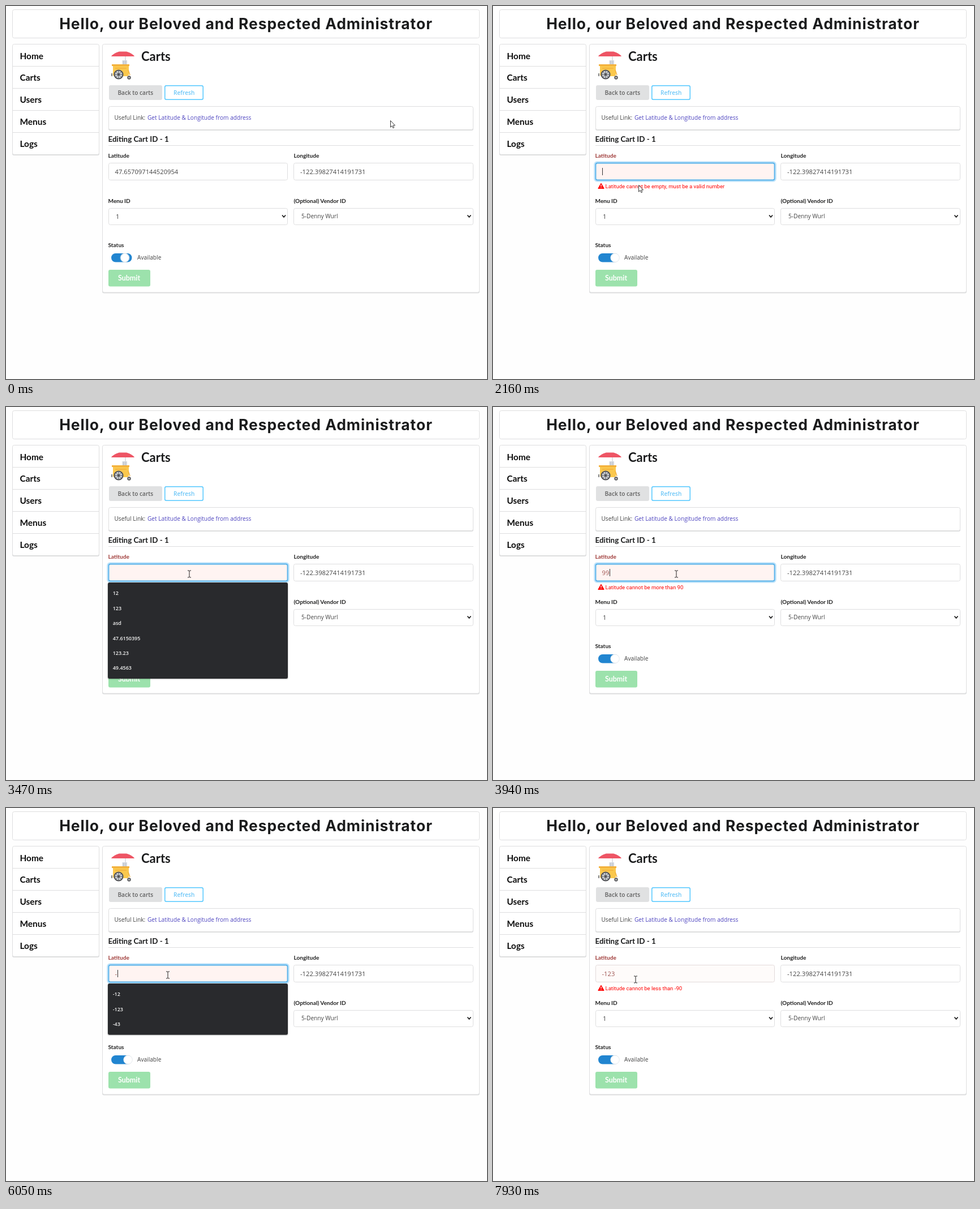
These frames come from a looping animation (850x659 px, 7.99 s). An HTML page:

```html
<!DOCTYPE html>
<html lang="en">
<head>
<meta charset="utf-8">
<title>Cart admin</title>
<style>
html, body { margin: 0; width: 100%; height: 100%; overflow: hidden; background: #fefefe; }
svg { display: block; width: 850px; height: 659px; }
text { white-space: pre; }
.title { font: 700 26.5px Inter, sans-serif; letter-spacing: .92px; fill: #1b1c1d; text-anchor: middle; }
.nav { font: 700 15.4px Lato, sans-serif; fill: #0d0d0d; }
.h2 { font: 700 22px Lato, sans-serif; fill: #1b1c1d; }
.h4 { font: 700 13.4px Lato, sans-serif; fill: #1b1c1d; }
.label { font: 700 10.1px Lato, sans-serif; fill: #222; }
.body { font: 400 10.15px "Open Sans", sans-serif; fill: #444; }
.input { font: 400 11.2px "Open Sans", sans-serif; fill: #444; }
.btn { font: 600 10.1px "Open Sans", sans-serif; text-anchor: middle; }
.submit { font: 700 12.5px Lato, sans-serif; fill: #fff; text-anchor: middle; }
.error { font: 400 9.55px Roboto, sans-serif; fill: #f00; }
.item { font: 600 9px "Open Sans", sans-serif; fill: #f2f2f2; }
.card { fill: #fff; stroke: #dededf; }
.shade { fill: #dcddde; }
.box { fill: #fff; stroke: #dededf; }
.rule { stroke: #dededf; }
.chev { fill: none; stroke: #111; stroke-width: 1.6; }
.knob { animation: slide 180ms ease-out both; }
@keyframes slide { from { transform: translateX(-5.5px); } to { transform: none; } }
</style>
</head>
<body>
<svg viewBox="0 0 850 659">
  <rect class="card" x="11.5" y="6.5" width="825" height="50" rx="3"/>
  <text class="title" x="424" y="40.5">Hello, our Beloved and Respected Administrator</text>

  <rect class="shade" x="11" y="69" width="154" height="195" rx="3"/>
  <rect class="card" x="11.5" y="67.5" width="153" height="195" rx="3"/>
  <g id="nav"></g>

  <rect class="shade" x="170" y="69" width="667" height="438.5" rx="3"/>
  <rect class="card" x="170.5" y="67.5" width="666" height="438.5" rx="3"/>

  <g id="cart">
    <path d="M211 88v16" stroke="#d3d6db" stroke-width="1.4"/>
    <rect x="205.5" y="96" width="8.5" height="8" fill="#d5d9df"/>
    <path d="M207.500 97v6M211 97v6" stroke="#b4bac3" stroke-width=".8"/>
    <path d="M186 89q3-5 14-8.500h13q11 3.500 14 8.500z" fill="#ee5565"/>
    <path d="M189 105h28v16q0 3-3 3h-22q-3 0-3-3z" fill="#fbc84d"/>
    <path d="M187 103h31v3h-31z" fill="#f3b13c"/>
    <path d="M193 110h20" stroke="#f3b13c" stroke-width="1.500"/>
    <path d="M216 113l3 9" stroke="#f3b13c" stroke-width="1.500"/>
    <path d="M187 119v5" stroke="#666" stroke-width="1.600"/>
    <circle cx="199" cy="121" r="7.500" fill="#cfd3d8" stroke="#55565a" stroke-width="2.200"/>
    <path d="M199 114v14M192 121h14M194 116l10 10M204 116l-10 10" stroke="#55565a"/>
    <circle cx="199" cy="121" r="2.400" fill="#55565a"/>
    <circle cx="217.500" cy="126.500" r="2.400" fill="#bbb" stroke="#55565a" stroke-width="1.600"/>
  </g>
  <text class="h2" x="239" y="96.500">Carts</text>

  <rect x="182" y="140" width="94" height="26" rx="3" fill="#e0e1e2"/>
  <text class="btn" x="228.800" y="157" fill="#606060">Back to carts</text>
  <rect x="280.750" y="140.750" width="67.500" height="24.500" rx="2.500" fill="#fff" stroke="#54c8ff" stroke-width="1.500"/>
  <text class="btn" x="314.700" y="157" fill="#6cc6f7">Refresh</text>

  <rect class="shade" x="181" y="179" width="645" height="41" rx="3"/>
  <rect class="card" x="181.500" y="177.500" width="644" height="41" rx="3"/>
  <text class="body" x="191.500" y="201">Useful Link:</text>
  <text class="body" x="250" y="201" style="fill:#4f46c0">Get Latitude &amp; Longitude from address</text>

  <text class="h4" x="180.500" y="240">Editing Cart ID - 1</text>
  <path class="rule" d="M181 246.500H826"/>

  <text class="label" id="latLabel" x="180.500" y="268">Latitude</text>
  <text class="label" x="508.500" y="268">Longitude</text>
  <text class="label" x="180.500" y="348">Menu ID</text>
  <text class="label" x="508.500" y="348">(Optional) Vendor ID</text>
  <text class="label" x="180.500" y="426">Status</text>

  <rect class="box" x="508.500" y="277.500" width="317" height="30" rx="3"/>
  <text class="input" x="520" y="296.500">-122.39827414191731</text>
  <rect class="box" x="181.500" y="357.500" width="316" height="29" rx="3"/>
  <text class="input" x="194" y="375.500">1</text>
  <path class="chev" d="M488 369.500l3 3.500 3-3.500"/>
  <rect class="box" x="508.500" y="357.500" width="317" height="29" rx="3"/>
  <text class="body" x="522" y="375.300">5-Denny Wurl</text>
  <path class="chev" d="M815.500 369.500l3 3.500 3-3.500"/>

  <rect x="186" y="437" width="36.500" height="15.500" rx="7.700" fill="#2185d0"/>
  <circle class="knob" id="knob" cx="215.500" cy="444.800" r="7.800" fill="#fff" stroke="#d5dbe0" stroke-width=".6"/>
  <text class="body" x="232" y="448.300">Available</text>

  <rect x="181" y="466" width="74" height="29.500" rx="3" fill="#9ce2ac"/>
  <text class="submit" x="217.500" y="485">Submit</text>

  <g id="error">
    <path d="M191 313.500l5 8.800h-10z" fill="#f00" stroke="#f00" stroke-width="1.200" stroke-linejoin="round"/>
    <path d="M191 315.800v3.200M191 320.300v1.300" stroke="#fff" stroke-width="1.300"/>
    <text class="error" id="message" x="198.500" y="321.700"></text>
  </g>

  <rect id="glow" x="180" y="276" width="319" height="33" rx="4" fill="none" stroke="#bfe3fa" stroke-width="3.500"/>
  <rect id="field" x="181.500" y="277.500" width="316" height="30" rx="3"/>
  <rect id="selection" y="286" height="13" fill="#bcbcbc"/>
  <text class="input" id="value" x="192.500" y="296.500"></text>
  <path id="caret" stroke="#333"/>

  <g id="menu">
    <rect id="menuShade" x="179" y="310.500" width="320" rx="3.500" fill="#000" opacity=".15"/>
    <rect id="menuBox" x="180" y="310" width="318" rx="3" fill="#292a2d"/>
    <g id="items"></g>
  </g>

  <g id="cursor">
    <path id="arrow" d="M.5.5v11.700l2.700-2.500 1.700 3.900 1.900-.8-1.700-3.800h3.400z" fill="#fff" stroke="#222" stroke-width=".9"/>
    <path id="beam" d="M-3-6h2.200L0-5.200.8-6H3M0-5.200V5.200M-3 6h2.200L0 5.200.8 6H3" fill="none" stroke="#222"/>
    <circle id="ring" r="7.300" fill="none" stroke="#333"/>
  </g>
</svg>
<script>
const LOOP = 7990, TEXT_X = 192.5, ROW = 26.4;
const NS = "http://www.w3.org/2000/svg";
const el = Object.fromEntries([...document.querySelectorAll("[id]")].map(n => [n.id, n]));

function add(parent, tag, attrs, text = "") {
  const node = document.createElementNS(NS, tag);
  set(node, attrs);
  node.textContent = text;
  parent.append(node);
}
function set(node, attrs) {
  for (const k in attrs) node.setAttribute(k, attrs[k]);
}
const show = (node, on) => node.setAttribute("visibility", on ? "visible" : "hidden");

["Home", "Carts", "Users", "Menus", "Logs"].forEach((name, i) => {
  const y = 93.5 + i * 38.85;
  add(el.nav, "text", { class: "nav", x: 24.5, y }, name);
  if (i) add(el.nav, "path", { class: "rule", d: `M12 ${Math.round(y - 25) - .5}H164` });
});

// Pointer path: time, x, y
const PATH = [
  [0, 679, 202], [60, 679, 202], [500, 315, 295], [740, 315, 295],
  [1380, 73, 292], [1440, 73, 292], [1560, 127, 298], [1740, 127, 298],
  [2460, 335, 327], [2580, 335, 327], [2820, 323, 295], [2940, 324, 295],
  [4000, 324, 295], [4360, 345, 336], [4500, 345, 336], [4620, 340, 329],
  [4780, 340, 329], [4920, 293, 301], [5040, 286, 295], [7100, 286, 295],
  [7500, 253, 350], [7660, 253, 350], [7930, 252, 303], [LOOP, 252, 303]
];

const EMPTY = "Latitude cannot be empty, must be a valid number";
const HIGH = "Latitude cannot be more than 90";
const LOW = "Latitude cannot be less than -90";
const PINK = "#fff4f2";

// Form changes; each entry overrides the state before it
const STEPS = [
  [0, { value: "47.657097144520954", focus: 0, caret: 0, select: "", error: "", bg: "#fff", items: [] }],
  [680, { focus: 1, caret: 1 }],
  [740, { caret: 0, select: "drag" }],
  [1860, { value: "", select: "", caret: 1, error: EMPTY, bg: PINK }],
  [2360, { caret: 0 }],
  [2460, { focus: 0 }],
  [2940, { focus: 1, caret: 1, items: ["12", "123", "asd", "47.6150395", "123.23", "49.4563"] }],
  [3470, { caret: 0 }],
  [3710, { value: "9", caret: 1, error: "", bg: "#fff", items: [] }],
  [3890, { value: "99", error: HIGH, bg: PINK }],
  [4360, { focus: 0, caret: 0 }],
  [5100, { focus: 1, caret: 1 }],
  [5220, { caret: 0, select: "all" }],
  [6050, { value: "-", caret: 1, select: "", error: EMPTY, items: ["-12", "-123", "-43"] }],
  [6600, { caret: 0 }],
  [6840, { value: "-1", caret: 1, error: "", bg: "#fff", items: ["-12", "-123"] }],
  [7020, { value: "-12" }],
  [7200, { value: "-123", error: LOW, bg: "#fefbfa", items: [] }],
  [7560, { focus: 0, caret: 0 }]
];

function pointer(t) {
  const i = Math.max(1, PATH.findIndex(p => p[0] > t));
  const [t0, x0, y0] = PATH[i - 1], [t1, x1, y1] = PATH[i];
  let k = (t - t0) / (t1 - t0);
  k = k * k * (3 - 2 * k);
  return [x0 + (x1 - x0) * k, y0 + (y1 - y0) * k];
}

const overField = (x, y) => x > 181 && x < 498 && y > 277 && y < 308;

let lastItems = null;
function drawMenu(items) {
  if (items === lastItems) return;
  lastItems = items;
  show(el.menu, items.length);
  const height = items.length * ROW + 11.6;
  set(el.menuBox, { height });
  set(el.menuShade, { height: height + 1 });
  el.items.replaceChildren();
  items.forEach((s, i) => add(el.items, "text", { class: "item", x: 188.7, y: 332.3 + i * ROW }, s));
}

function draw(t) {
  const s = Object.assign({}, ...STEPS.filter(e => e[0] <= t).map(e => e[1]));
  const [x, y] = pointer(t);

  el.value.textContent = s.value;
  el.value.style.fill = s.error ? "#9f5552" : "#444";
  el.latLabel.style.fill = s.error ? "#9f3a38" : "#222";
  el.message.textContent = s.error;
  show(el.error, s.error);
  set(el.field, {
    fill: s.bg,
    stroke: s.focus ? "#55b1ea" : s.error ? "#e2dada" : "#dededf",
    "stroke-width": s.focus ? 1.8 : 1
  });
  show(el.glow, s.focus);

  const end = TEXT_X + (s.value ? el.value.getComputedTextLength() : 0);
  const from = s.select === "drag" ? Math.min(end, Math.max(TEXT_X, x)) : TEXT_X;
  set(el.selection, { x: from, width: s.select ? end - from : 0 });
  set(el.caret, { d: `M${Math.round(end + .9) + .5} 286v13` });
  show(el.caret, s.caret);
  drawMenu(s.items);

  const beam = overField(x, y);
  set(el.cursor, { transform: `translate(${Math.round(x)} ${Math.round(y)})` });
  show(el.beam, beam);
  show(el.arrow, !beam);
  show(el.ring, t >= 2820 && t < 2940);
}

const slide = el.knob.getAnimations()[0];
if (slide) slide.pause();
function tick() {
  const t = performance.now() % LOOP;
  if (slide) slide.currentTime = Math.min(t, 180);
  draw(t);
  requestAnimationFrame(tick);
}
tick();
</script>
</body>
</html>
```
